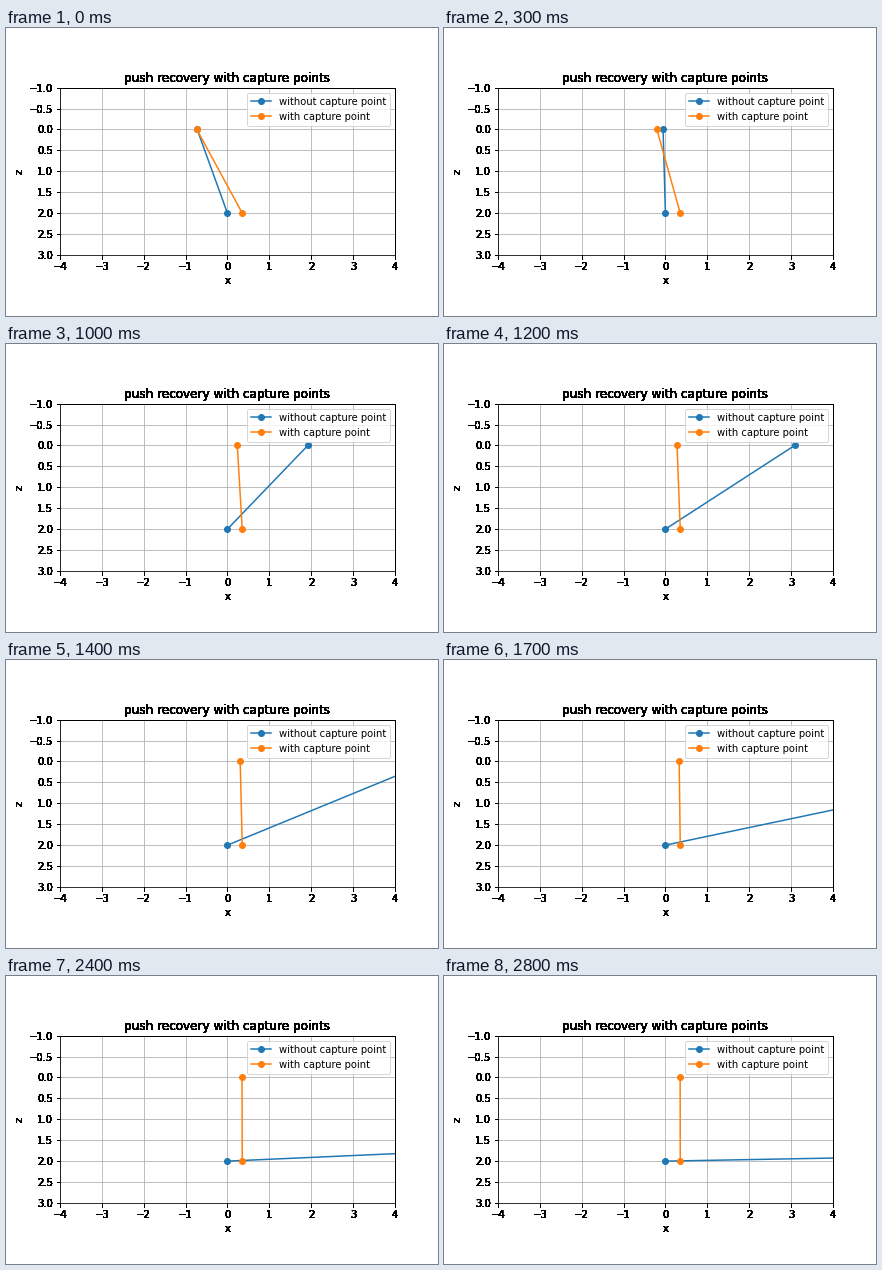
A matplotlib script that plays this animation: 432 by 288 pixels, repeating every 2900 ms.

```python
import numpy as np
import matplotlib.pyplot as plt
from matplotlib.animation import FuncAnimation

WIDTH, HEIGHT, DPI = 432, 288, 72
FRAMES, STEP_MS = 29, 100

# Linear inverted pendulum: pushed at x = X0 with speed V0
GRAVITY, LEG = 9.81, 2.0
X0, V0 = -1.0, 3.0
OMEGA = np.sqrt(GRAVITY / LEG)
CAPTURE = X0 + V0 / OMEGA


def free_position(t):
    return X0 * np.cosh(OMEGA * t) + V0 / OMEGA * np.sinh(OMEGA * t)


def captured_position(t):
    return CAPTURE + (X0 - CAPTURE) * np.exp(-OMEGA * t)


def darken(artist, passes=20):
    """Draw an artist repeatedly so its soft edges turn solid."""
    draw = artist.draw

    def draw_solid(renderer):
        for _ in range(passes):
            draw(renderer)

    artist.draw = draw_solid


fig, ax = plt.subplots(figsize=(WIDTH / DPI, HEIGHT / DPI), dpi=DPI,
                       facecolor="white")
fig.subplots_adjust(left=0.125, right=0.9, bottom=0.125, top=0.88)
ax.set_aspect("equal")
ax.set_xlim(-4, 4)
ax.set_ylim(3, -1)
ax.set_xticks(np.arange(-4, 5))
ax.set_yticks(np.arange(-1, 3.5, 0.5))
ax.grid(True)

title = ax.set_title("push recovery with capture points")
xlabel = ax.set_xlabel("x")
ylabel = ax.set_ylabel("z")

free_leg, = ax.plot([], [], "o-", label="without capture point")
captured_leg, = ax.plot([], [], "o-", label="with capture point")
ax.legend(loc="upper right")

for artist in (title, xlabel, ylabel, ax.spines["top"], ax.spines["right"]):
    darken(artist)
for tick in ax.xaxis.get_major_ticks() + ax.yaxis.get_major_ticks():
    darken(tick.label1)
    darken(tick.tick1line)


def update(frame):
    t = (frame + 1) * STEP_MS / 1000
    free_leg.set_data([0, free_position(t)], [LEG, 0])
    captured_leg.set_data([CAPTURE, captured_position(t)], [LEG, 0])
    return free_leg, captured_leg


anim = FuncAnimation(fig, update, frames=FRAMES, interval=STEP_MS,
                     repeat=True, repeat_delay=0, blit=False)
plt.show()
```
